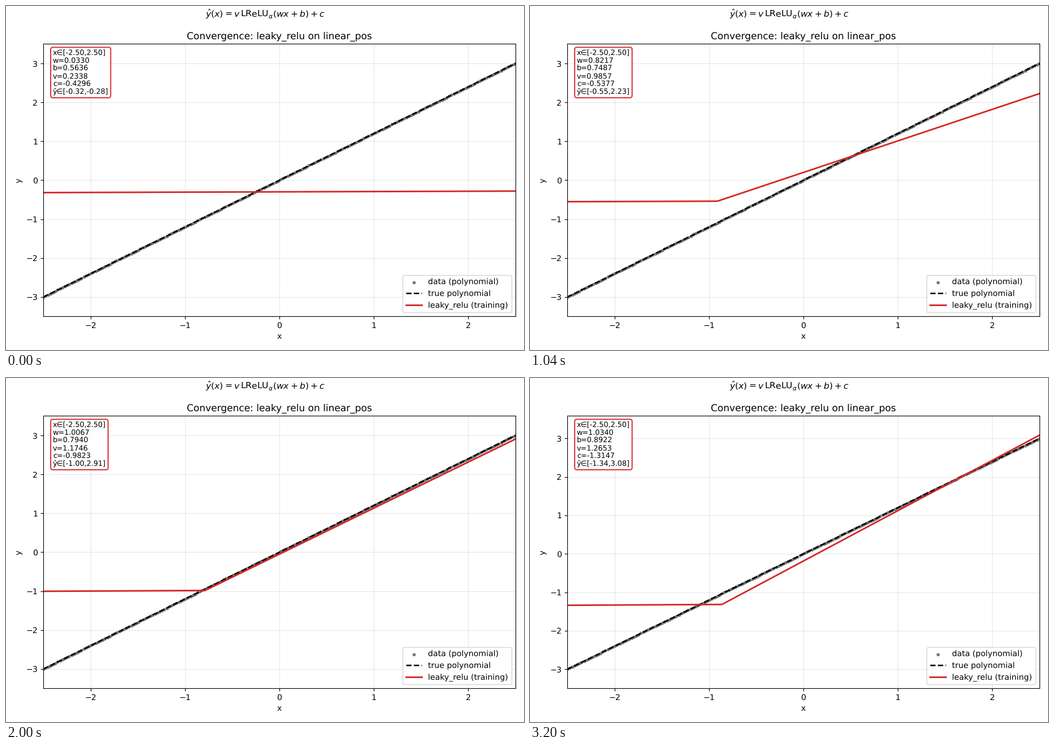
Write a matplotlib script that moves like this. It is 917 px wide and 611 px high and loops after 3.28 s.

```python
import numpy as np
import matplotlib.pyplot as plt
from matplotlib.animation import FuncAnimation

W, H, DPI = 917, 611, 101.875
LEFT, RIGHT, TOP, BOTTOM = 66.2, 901.7, 67.5, 551.5
FRAMES, INTERVAL = 41, 80
SLOPE = 1.2              # the straight line to be learned
ALPHA = 0.01             # negative slope of the leaky unit
RATE, STEPS = 0.001, 50  # gradient descent steps between two pictures
START = (0.0330, 0.5636, 0.2338, -0.4296)  # w, b, v, c

x_data = np.linspace(-2.5, 2.5, 200)
y_data = SLOPE * x_data
x_line = np.linspace(-2.5, 2.5, 400)


def leaky(z):
    return np.where(z > 0, z, ALPHA * z)


def model(p, x):
    w, b, v, c = p
    return v * leaky(w * x + b) + c


def gradient(p):
    """Gradient of the mean squared error."""
    w, b, v, c = p
    z = w * x_data + b
    r = 2 * (model(p, x_data) - y_data)
    back = r * v * np.where(z > 0, 1, ALPHA)
    return np.array([np.mean(back * x_data), np.mean(back),
                     np.mean(r * leaky(z)), np.mean(r)])


def train():
    p = np.array(START)
    history = [p]
    for _ in range(FRAMES - 1):
        for _ in range(STEPS):
            p = p - RATE * gradient(p)
        history.append(p)
    return history


history = train()

plt.rcParams["font.family"] = "DejaVu Sans"
plt.rcParams["text.hinting"] = "no_hinting"
fig = plt.figure(figsize=((W + 0.001) / DPI, (H + 0.001) / DPI), dpi=DPI,
                 facecolor="white")
ax = fig.add_axes([LEFT / W, 1 - BOTTOM / H,
                   (RIGHT - LEFT) / W, (BOTTOM - TOP) / H])
fig.suptitle(r"$\hat{y}(x) = v\,\mathrm{LReLU}_{\alpha}(wx + b) + c$",
             fontsize=11, y=0.995)
ax.set_title("Convergence: leaky_relu on linear_pos", fontsize=12)
ax.set_xlabel("x")
ax.set_ylabel("y")
ax.set_xlim(-2.5, 2.5)
ax.grid(True, alpha=0.3)

ax.scatter(x_data, y_data, s=9, color="black", alpha=0.45,
           label="data (polynomial)")
ax.plot(x_line, SLOPE * x_line, "k--", lw=1.8, label="true polynomial")
fit, = ax.plot([], [], color="tab:red", lw=2, label="leaky_relu (training)")
ax.legend(loc="lower right")
info = ax.text(0.02, 0.98, "", transform=ax.transAxes, fontsize=9,
               va="top", ha="left", linespacing=1.12,
               bbox=dict(boxstyle="round,pad=0.3", facecolor="white",
                         edgecolor="tab:red", lw=1.5, alpha=0.9))


def update(i):
    p = history[i]
    y = model(p, x_line)
    fit.set_data(x_line, y)
    ax.set_ylim(min(-3, y.min()) - 0.5, max(3, y.max()) + 0.5)
    lines = ["x∈[-2.50,2.50]"]
    lines += [f"{name}={value:.4f}" for name, value in zip("wbvc", p)]
    lines.append(f"ŷ∈[{y.min():.2f},{y.max():.2f}]")
    info.set_text("\n".join(lines))
    return fit, info


anim = FuncAnimation(fig, update, frames=FRAMES, interval=INTERVAL,
                     repeat=True, repeat_delay=0, blit=False)
plt.show()
```
